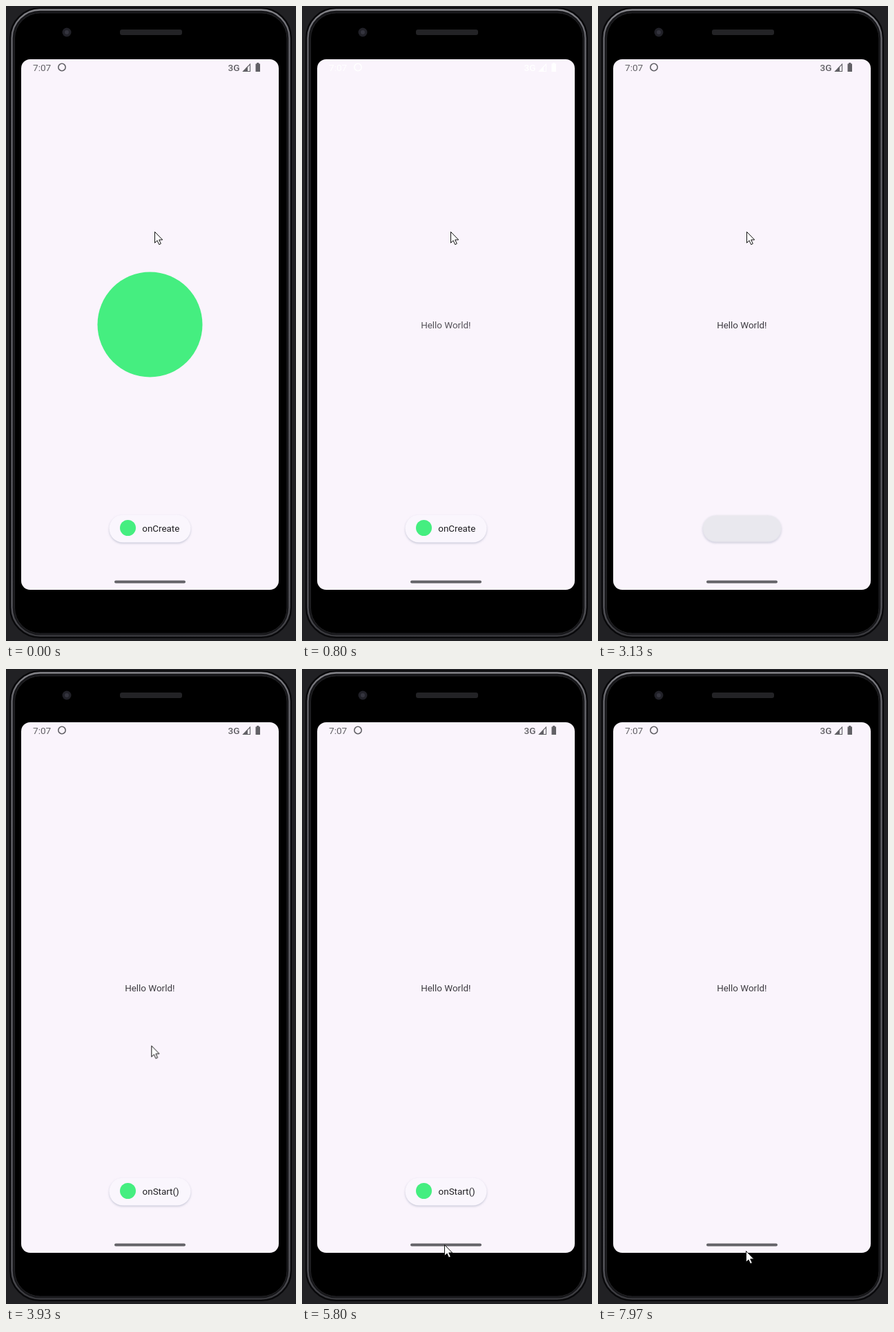
An HTML page that plays this animation: 420 px wide and 918 px high, repeating every 8 s.

```html
<!DOCTYPE html>
<html lang="en">
<head>
<meta charset="utf-8">
<title>Activity lifecycle toasts</title>
<style>
  html, body { margin: 0; width: 100%; height: 100%; overflow: hidden; background: #212124; }
  svg { display: block; width: 100vw; height: 100vh; }
  text { font: 13.4px Roboto, sans-serif; }
  .toast { transform-origin: 208.5px 755.5px; }
</style>
</head>
<body>
<svg viewBox="0 0 420 918" preserveAspectRatio="none">
  <defs>
    <linearGradient id="rim" x1="0" y1="0" x2="0" y2="1">
      <stop offset="0" stop-color="#85858a"/>
      <stop offset=".04" stop-color="#66666c"/>
      <stop offset=".95" stop-color="#56565c"/>
      <stop offset="1" stop-color="#38383c"/>
    </linearGradient>
    <filter id="soft" x="-20%" y="-40%" width="140%" height="180%">
      <feGaussianBlur stdDeviation="1.5"/>
    </filter>
  </defs>

  <!-- phone body -->
  <rect width="420" height="918" fill="#212124"/>
  <rect x="6" y="3" width="407" height="910" rx="43" fill="#0a0a0c" stroke="#08080a" stroke-width="2"/>
  <rect x="8.500" y="5.500" width="402" height="905" rx="41" fill="#161619" stroke="url(#rim)" stroke-width="2.4"/>
  <rect x="12.500" y="10" width="394.500" height="897" rx="37" fill="#000" stroke="#232326"/>
  <circle cx="88" cy="38" r="6.500" fill="#212128"/>
  <circle cx="88" cy="38" r="3" fill="#34343e"/>
  <rect x="165" y="34" width="90" height="8" rx="3" fill="#232326"/>

  <!-- screen -->
  <rect x="22" y="77" width="373" height="767" rx="13" fill="#faf4fc"/>
  <g id="status">
    <text x="39" y="94" style="font-size:13.6px">7:07</text>
    <circle cx="81" cy="88.500" r="5.200" fill="none" stroke="currentColor" stroke-width="1.6"/>
    <text x="321.500" y="93.500" style="font-size:13.6px;font-weight:500">3G</text>
    <path d="M343.500 94.500 L353.500 84 V94.500Z" fill="none" stroke="currentColor" stroke-width="1.1"/>
    <path d="M343.500 94.500 L350 87.500 V94.500Z"/>
    <path d="M361.500 83.500 h1.700 v-1.500 h3.100 v1.500 h1.700 v11.500 h-6.500z"/>
  </g>
  <text id="hello" x="208.300" y="466" text-anchor="middle" fill="#3d3b41">Hello World!</text>
  <circle id="splash" cx="208.500" cy="460.500" r="76" fill="#45ee80"/>
  <g id="toasts"></g>
  <rect x="157" y="830.500" width="103" height="4" rx="2" fill="#646368"/>
  <path id="cursor" d="M.5 .5 V16.500 L4 13 L6.700 18.800 L9.300 17.600 L6.700 12 H11.700Z"
        fill="#fff" stroke="#111" stroke-width="1"/>
</svg>

<script>
const LOOP = 8000;
const byId = id => document.getElementById(id);

// Each step is [ms, properties, easing towards the next step].
function play(el, steps) {
  const first = [0, steps[0][1]];
  const last = [LOOP, steps[steps.length - 1][1]];
  const frames = [first, ...steps, last].map(([ms, props, easing = 'linear']) =>
    ({ ...props, easing, offset: ms / LOOP }));
  el.animate(frames, { duration: LOOP, iterations: Infinity });
}

const opacity = value => ({ opacity: value });
const scale = value => ({ transform: `scale(${value})` });
const fill = value => ({ fill: value });
const ink = value => ({ fill: value, color: value });
const at = (x, y) => ({ transform: `translate(${x}px, ${y}px)` });

const PLAIN = '#faf6fd', TINT = '#e9e8ee';

function addToast(label, x, start, end) {
  const group = document.createElementNS('http://www.w3.org/2000/svg', 'g');
  group.setAttribute('class', 'toast');
  group.innerHTML = `
    <rect x="149.500" y="737" width="118" height="40" rx="20" fill="#c8c8d8" filter="url(#soft)"/>
    <rect x="149.500" y="735.500" width="118" height="40" rx="20"/>
    <g><circle cx="176.500" cy="754.500" r="11.500" fill="#45ee80"/>
    <text x="${x}" y="760" fill="#1f1e22">${label}</text></g>`;
  byId('toasts').append(group);
  const [shadow, pill, content] = group.children;

  const enters = start !== null;
  const intro = steps => enters ? steps : [];

  play(group, [
    ...intro([[start, scale(.9), 'cubic-bezier(0,0,0,1)'], [start + 333, scale(1)]]),
    [end, scale(1), 'cubic-bezier(.3,0,1,1)'], [end + 250, scale(.9)]
  ]);
  play(group, [
    ...intro([[start, opacity(0)], [start + 66, opacity(1)]]),
    [end + 150, opacity(1)], [end + 250, opacity(0)]
  ]);
  play(content, [
    ...intro([[start + 70, opacity(0)], [start + 333, opacity(1)]]),
    [end, opacity(1)], [end + 166, opacity(0)]
  ]);
  play(shadow, [[end, opacity(1)], [end + 40, opacity(0)]]);
  play(pill, [
    ...intro([[start + 90, fill(TINT)], [start + 250, fill(PLAIN)]]),
    [end, fill(PLAIN)], [end + 130, fill(TINT)]
  ]);
}

addToast('onCreate', 197.300, null, 2780);
addToast('onStart()', 197.600, 3062, 6435);

play(byId('splash'), [[350, opacity(1)], [560, opacity(0)]]);
play(byId('hello'), [[520, opacity(0)], [840, opacity(1)]]);

const DARK = ink('#626166'), LIGHT = ink('#ffffff');
play(byId('status'), [[600, DARK], [720, LIGHT], [900, LIGHT], [1020, DARK]]);

play(byId('cursor'), [
  [3400, at(215, 326), 'ease-in-out'],
  [4500, at(205, 790)],
  [5100, at(205, 790), 'ease-in-out'],
  [5800, at(206, 832)],
  [6800, at(206, 832), 'ease-in-out'],
  [7500, at(214, 841)]
]);
</script>
</body>
</html>
```
